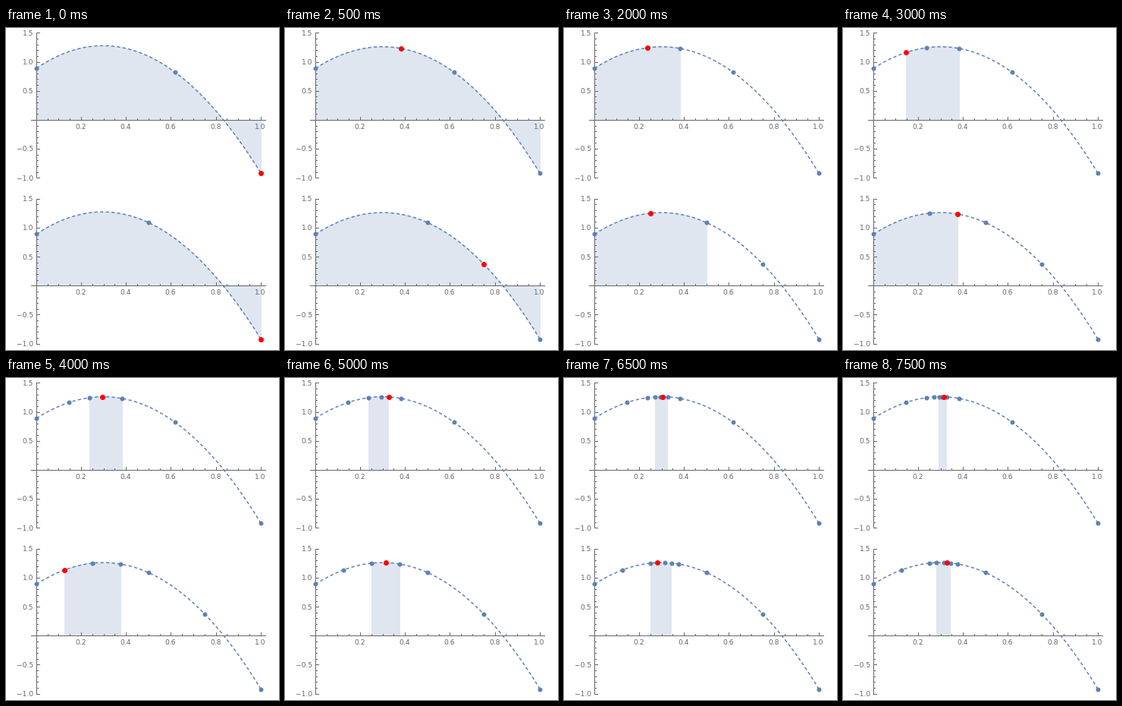
Animation, 360 px wide and 424 px high, one loop 8000 ms. Source, as a matplotlib script:

```python
import numpy as np
import matplotlib.pyplot as plt
from matplotlib.animation import FuncAnimation
from matplotlib.patches import Polygon

W, H, DPI = 360, 424, 100
PX = 72 / DPI                      # points per pixel
STEPS, STEP_MS = 16, 500
X0, SX, SY = 40.2, 296, 76.3       # plot units to pixels
BLUE, FILL, RED, GREY = "#5e81b5", "#dfe6f0", "#ff0000", "#666666"
GOLD = (np.sqrt(5) - 1) / 2


def f(x):
    return 0.896 + 2.601 * x - 4.413 * x**2 - 0.27 * x * (x - 0.5) * (x - 1)


def golden_probe(lo, best, hi):
    return lo + hi - best


def halving_probe(lo, best, hi):
    return (best + hi) / 2 if hi - best >= best - lo else (lo + best) / 2


def search(start, probe):
    """Bracket and sample points per step: sample, shrink, sample, ..."""
    lo, best, hi = 0.0, start, 1.0
    points = [lo, best, hi]
    states = [(lo, hi, tuple(points))]
    while len(states) < STEPS:
        x = probe(lo, best, hi)
        points.append(x)
        states.append((lo, hi, tuple(points)))
        left, right = sorted((x, best))
        if f(left) > f(right):
            best, hi = left, right
        else:
            lo, best = left, right
        states.append((lo, hi, tuple(points)))
    return states[:STEPS]


fig = plt.figure(figsize=(W / DPI, H / DPI), dpi=DPI, facecolor="white")
ax = fig.add_axes([0, 0, 1, 1])
ax.set_xlim(0, W)
ax.set_ylim(H, 0)
ax.axis("off")


class Panel:
    def __init__(self, y0, states):
        self.y0, self.states = y0, states
        self.area = ax.add_patch(Polygon([(0, 0)] * 3, fc=FILL, lw=0, zorder=1,
                                         antialiased=False))
        self.draw_axes()
        self.curve, = ax.plot([], [], color=BLUE, lw=1.5 * PX, zorder=3,
                              dashes=(2.8, 2.2), dash_capstyle="butt")
        self.dots = self.marker(BLUE, 6, 4)
        self.probe = self.marker(RED, 7, 5)

    def px(self, x, y):
        return X0 + SX * np.asarray(x), self.y0 - SY * np.asarray(y)

    def marker(self, color, size, z):
        return ax.plot([], [], "o", color=color, ms=size * PX, mew=0,
                       zorder=z, snap=False)[0]

    def line(self, xs, ys):
        # whole pixel rows and columns
        ax.plot(np.floor(xs) + 0.5, np.floor(ys) + 0.5, color=GREY, lw=PX,
                zorder=2, solid_capstyle="projecting", snap=False)

    def label(self, x, y, value, ha):
        text = f"{value:.1f}".replace("-", "\u2212")
        ax.text(x, y, text, ha=ha, va="center_baseline", color=GREY,
                family="DejaVu Sans", size=9.2 * PX)

    def draw_axes(self):
        y0 = self.y0
        self.line([33, 342], [y0, y0])
        self.line([X0, X0], [y0 - 1.5 * SY, y0 + SY])
        for i in range(1, 21):
            x = X0 + SX * i / 20
            major = i % 4 == 0
            self.line([x, x], [y0, y0 - (4 if major else 2)])
            if major:
                self.label(x - 0.7, y0 + 8, i / 20, "center")
        for i in range(-10, 16):
            y = y0 - SY * i / 10
            major = i % 5 == 0
            self.line([X0, X0 + (4 if major else 2)], [y, y])
            if major and i:
                self.label(36.2, y - 0.6, i / 10, "right")

    def show(self, step):
        lo, hi, points = self.states[step]
        xs = np.array(points)
        model = np.polyfit(xs, f(xs), min(len(xs) - 1, 3))
        t = np.linspace(0, 1, 300)
        self.curve.set_data(*self.px(t, np.polyval(model, t)))
        t = np.linspace(lo, hi, 200)
        edge = np.column_stack(self.px(t, np.polyval(model, t)))
        base = np.column_stack(self.px([hi, lo], [0, 0]))
        self.area.set_xy(np.vstack([edge, base]))
        self.dots.set_data(*self.px(xs[:-1], f(xs[:-1])))
        self.probe.set_data(*self.px(xs[-1:], f(xs[-1:])))
        return [self.area, self.curve, self.dots, self.probe]


panels = [Panel(121.4, search(GOLD, golden_probe)),
          Panel(339.8, search(0.5, halving_probe))]


def update(step):
    return [artist for p in panels for artist in p.show(step)]


anim = FuncAnimation(fig, update, frames=STEPS, interval=STEP_MS,
                     repeat=True, repeat_delay=0, blit=False)
plt.show()
```
